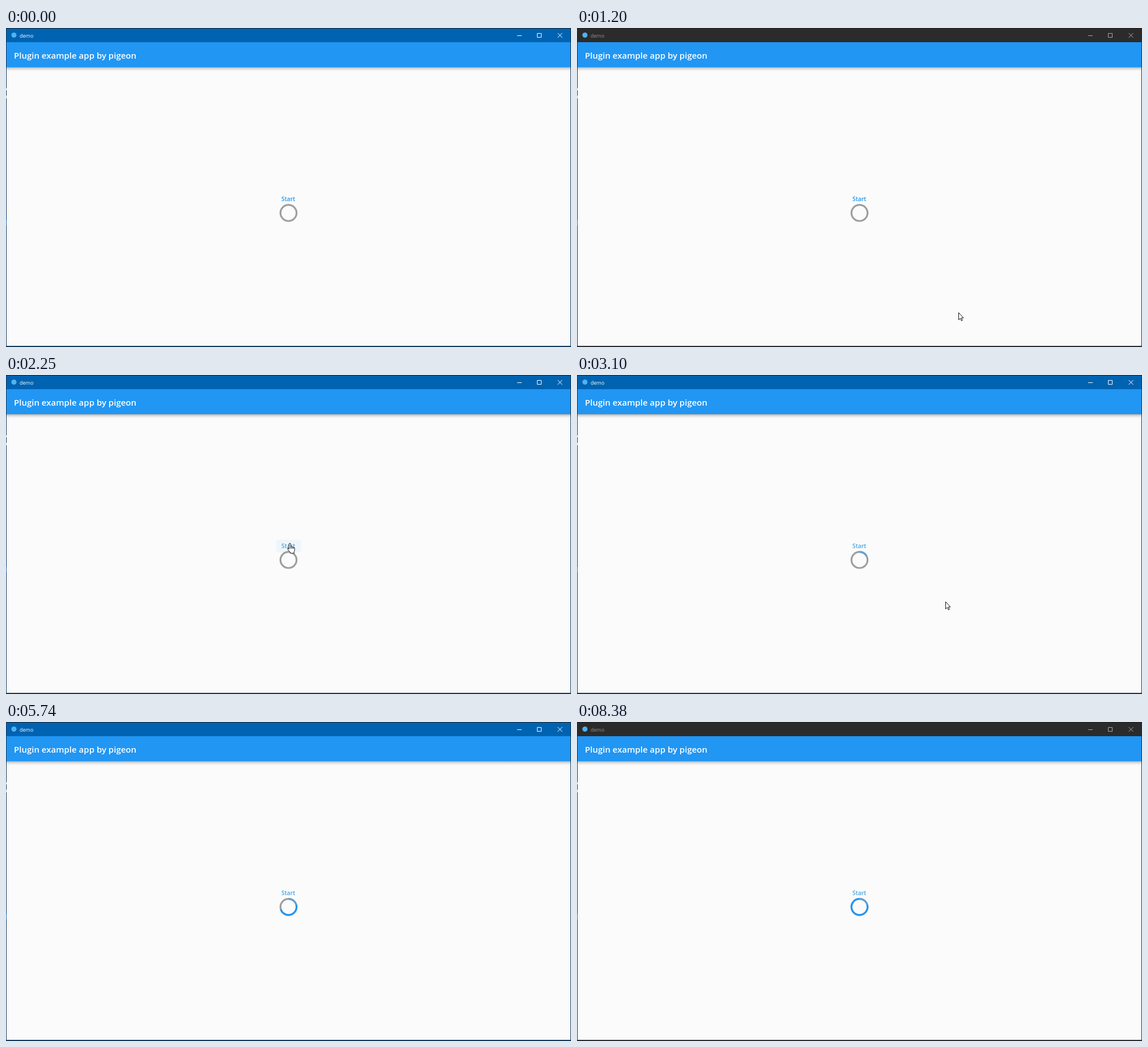
Write an HTML page with a canvas that moves like this. It is 997 px wide and 562 px high and loops after 8710 ms.

```html
<!DOCTYPE html>
<html lang="en">
<head>
<meta charset="utf-8">
<title>demo</title>
<style>
  html, body { margin: 0; width: 100%; height: 100%; overflow: hidden; background: #1c1c22; }
  canvas { display: block; }
</style>
</head>
<body>
<canvas id="stage" width="997" height="562"></canvas>
<script>
const ctx = document.getElementById('stage').getContext('2d');
const LOOP = 8710, BLUR = 210, SHOW = 1200, HOVER = 2140, CLICK = 2230, LEAVE = 2740,
      GONE = 3840, DONE = 7230, BLUR_AGAIN = 8380;
const FONT = '"Open Sans", "Noto Sans", sans-serif';
const BLUE = '#2196f3', PALE = '#4ba3e3';

// pointer hot spot: time, x, y
const TRACK = [
  [1200, 673, 501], [1340, 698, 442], [1480, 704, 375], [1620, 670, 300], [1750, 600, 259],
  [1880, 530, 266], [2000, 488, 288], [2140, 501, 296], [2600, 501, 297], [2740, 513, 313],
  [2900, 545, 317], [3000, 594, 342], [3100, 650, 399], [3300, 661, 440], [3600, 660, 500], [3840, 656, 563]
];
const ARROW = new Path2D('M.5.5V13.2L3.4 10.4L5.3 14.8L7.2 14L5.3 9.8H9Z');
const HAND = new Path2D('M-1.5 10.5V1.8a1.4 1.4 0 0 1 2.8 0V6.3q1.5-.9 2.4.5q1.6-.6 2.3.8q2.3-.2 2.3 1.9' +
  'V12.5q0 1.8-1 3V18H.6V16.3Q-2.3 13.8-4 10.6Q-4.5 8.8-2.9 9.1Z');
const KNUCKLES = new Path2D('M1.3 6.3V10M3.7 7V10M6 7.8V10.2');

function rect(x, y, w, h, color) {
  ctx.fillStyle = color;
  ctx.fillRect(x, y, w, h);
}

function text(str, x, y, size, weight, color) {
  ctx.font = `${weight} ${size}px ${FONT}`;
  ctx.fillStyle = color;
  ctx.fillText(str, x, y);
}

// angles in turns, clockwise from the top
function arc(from, to, color) {
  if (to <= from) return;
  const angle = turn => (turn - 0.25) * 2 * Math.PI;
  ctx.beginPath();
  ctx.arc(498.5, 325.8, 14.2, angle(from), angle(to));
  ctx.lineWidth = 3.2;
  ctx.strokeStyle = color;
  ctx.stroke();
}

function pointerAt(t) {
  const i = TRACK.findIndex(key => key[0] > t);
  const [t0, x0, y0] = TRACK[i - 1], [t1, x1, y1] = TRACK[i];
  const k = (t - t0) / (t1 - t0);
  return [Math.round(x0 + (x1 - x0) * k), Math.round(y0 + (y1 - y0) * k)];
}

function drawFrameAndBars(active) {
  rect(0, 0, 997, 562, active ? '#12375a' : '#2b2b31');
  rect(0, 0, 997, 1, '#1b1d22');
  rect(0, 106, 1, 4, '#c5c9cc');
  rect(0, 119, 1, 5, '#c5c9cc');
  rect(0, 338, 1, 10, '#1c6cb4');

  rect(1, 1, 995, 24, active ? '#0063b1' : '#2b2b2b');
  rect(1, 69, 995, 491, '#fafbfa');
  const shade = ctx.createLinearGradient(0, 69, 0, 76);
  shade.addColorStop(0, 'rgba(0,0,0,.32)');
  shade.addColorStop(0.4, 'rgba(0,0,0,.12)');
  shade.addColorStop(1, 'rgba(0,0,0,0)');
  rect(1, 69, 995, 7, shade);
  rect(1, 25, 995, 44, BLUE);

  ctx.beginPath();
  ctx.arc(14, 12.5, 4.5, 0, 2 * Math.PI);
  ctx.fillStyle = '#4fb3f3';
  ctx.fill();
  text('demo', 24, 16.5, 9, 400, active ? '#fff' : '#929292');
  text('Plugin example app by pigeon', 14, 54, 15, 600, '#fff');

  ctx.strokeStyle = active ? '#fff' : '#aaa';
  ctx.lineWidth = 1;
  ctx.stroke(new Path2D('M902 13.5h8M937.5 9.5h7v7h-7zM973.5 9l8 8M981.5 9l-8 8'));
}

function drawPointer(t) {
  if (t < SHOW || t >= GONE) return;
  const [x, y] = pointerAt(t);
  ctx.save();
  ctx.translate(x, y);
  ctx.lineWidth = 1;
  ctx.lineJoin = 'round';
  ctx.fillStyle = '#fff';
  ctx.strokeStyle = '#111';
  const hand = t >= HOVER && t < LEAVE;
  const shape = hand ? HAND : ARROW;
  ctx.fill(shape);
  ctx.stroke(shape);
  if (hand) ctx.stroke(KNUCKLES);
  ctx.restore();
}

function draw(t) {
  drawFrameAndBars(t < BLUR || (t >= CLICK && t < BLUR_AGAIN));

  if (t >= HOVER && t < LEAVE) {
    ctx.beginPath();
    ctx.roundRect(477, 290, 43.5, 22, 3);
    ctx.fillStyle = '#eff6fb';
    ctx.fill();
  }
  ctx.textAlign = 'center';
  text('Start', 498.2, 304.8, 10.3, 600, t < CLICK ? BLUE : PALE);
  ctx.textAlign = 'left';

  // one hundred steps over five seconds
  const raw = (t - CLICK) / (DONE - CLICK);
  const done = Math.floor(Math.min(1, Math.max(0, raw)) * 100) / 100;
  arc(0, 1, '#9e9e9e');
  arc(0, Math.min(done, 0.21), '#62a2d3');
  arc(0.21, done, BLUE);

  drawPointer(t);
}

function tick() {
  draw(performance.now() % LOOP);
  requestAnimationFrame(tick);
}
tick();
</script>
</body>
</html>
```
